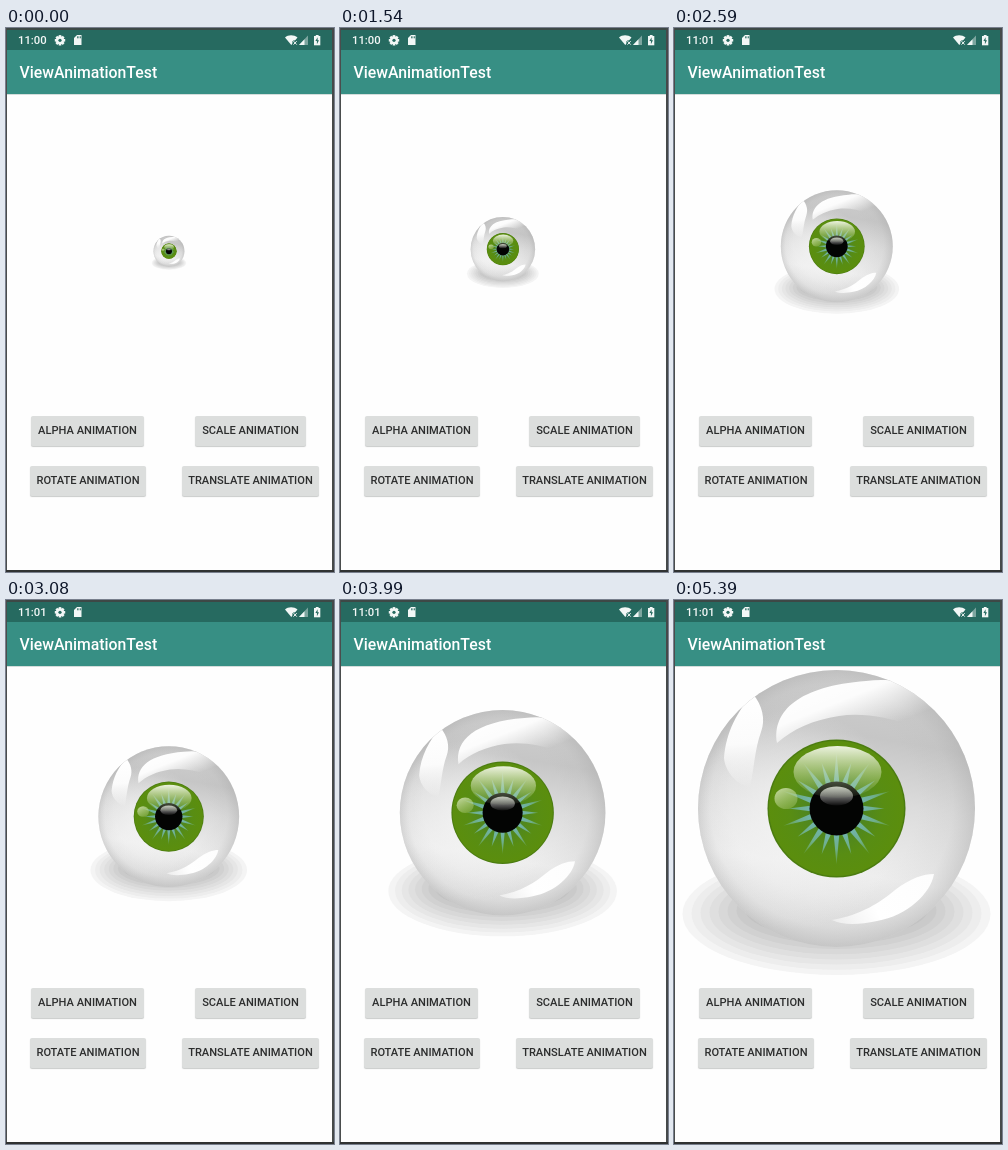
Write an HTML page with a canvas that moves like this. It is 328x544 px and loops after 5.46 s.

```html
<!DOCTYPE html>
<html lang="en">
<head>
<meta charset="utf-8">
<title>View animation</title>
<style>
html, body { margin: 0; width: 100%; height: 100%; overflow: hidden; background: #fefefe; }
#stage { position: relative; width: 328px; height: 544px; overflow: hidden; font-family: Roboto, "Noto Sans", sans-serif; font-weight: 500; }
#stage > * { position: absolute; white-space: nowrap; box-sizing: border-box; }
canvas { left: 0; top: 0; }
#clock { left: 12px; top: 3px; line-height: 19px; font-size: 11.3px; color: #f4f8f7; }
#title { left: 13.5px; top: 22px; line-height: 45px; font-size: 15.8px; color: #fff; }
.btn { height: 30px; line-height: 30px; font-size: 11.1px; text-align: center; color: #2c2d2d; background: #dcdedd; border-radius: 2px; box-shadow: 0 1px 1px #c9cbca; }
</style>
</head>
<body>
<div id="stage">
  <canvas id="c" width="328" height="544"></canvas>
  <div id="clock">11:00</div>
  <div id="title">ViewAnimationTest</div>
  <div class="btn" style="left:25px;top:388px;width:113px">ALPHA ANIMATION</div>
  <div class="btn" style="left:189px;top:388px;width:111px">SCALE ANIMATION</div>
  <div class="btn" style="left:24px;top:438px;width:116px">ROTATE ANIMATION</div>
  <div class="btn" style="left:176px;top:438px;width:137px">TRANSLATE ANIMATION</div>
</div>
<script>
const g = document.getElementById('c').getContext('2d');
const clock = document.getElementById('clock');
const LOOP = 5460, STEP = 70, TAU = Math.PI * 2;

// progress of the scale animation: [ms, fraction]
const keys = [[0, .073], [910, .169], [2100, .324], [2590, .395], [3500, .535], [3920, .622], [4410, .752], [5390, 1]];

function progress(ms) {
  let i = 1;
  while (i < keys.length - 1 && ms > keys[i][0]) i++;
  const [t0, p0] = keys[i - 1], [t1, p1] = keys[i];
  return Math.min(1, p0 + (p1 - p0) * (ms - t0) / (t1 - t0));
}

function scaleAt(ms) {
  return .1 + .9 * (1 - Math.cos(Math.PI * progress(ms))) / 2;
}

function rect(x, y, w, h, fill) {
  g.fillStyle = fill;
  g.fillRect(x, y, w, h);
}

function oval(x, y, rx, ry, fill) {
  g.fillStyle = fill;
  g.beginPath();
  g.ellipse(x, y, rx, ry, 0, 0, TAU);
  g.fill();
}

function shape(d, fill) {
  g.fillStyle = fill;
  g.fill(new Path2D(d));
}

function stops(grad, list) {
  list.forEach(([at, color]) => grad.addColorStop(at, color));
  return grad;
}
const linear = (x0, y0, x1, y1, ...list) => stops(g.createLinearGradient(x0, y0, x1, y1), list);
const radial = (x0, y0, r0, x1, y1, r1, ...list) => stops(g.createRadialGradient(x0, y0, r0, x1, y1, r1), list);

function statusIcons() {
  const white = '#f2f7f6';
  // gear
  g.save();
  g.translate(54, 12.3);
  for (let i = 0; i < 8; i++) {
    rect(-1.3, -5.2, 2.6, 3, white);
    g.rotate(TAU / 8);
  }
  oval(0, 0, 4, 4, white);
  oval(0, 0, 1.6, 1.6, '#266a60');
  g.restore();
  // memory card
  shape('M71 7H75.5V17H68V10Z', white);
  for (let i = 0; i < 3; i++) rect(71 + i * 1.5, 8.3, .8, 2, '#266a60');
  // wifi
  shape('M279 9.5C282 6.4 288 6.4 291.5 9.5L285.3 17Z', white);
  g.strokeStyle = '#266a60';
  g.lineWidth = 3;
  g.stroke(new Path2D('M287 13L291 17M291 13L287 17'));
  g.strokeStyle = white;
  g.lineWidth = 1;
  g.stroke(new Path2D('M287.5 13.2L290.7 16.6M290.7 13.2L287.5 16.6'));
  // signal
  shape('M302 7.5V17H293Z', 'rgba(255,255,255,.4)');
  shape('M298.5 11.2V17H293Z', white);
  // battery
  rect(309.8, 7, 2.8, 2, white);
  rect(308, 8, 6.3, 9.3, white);
  shape('M311.6 9.2L309.4 13H310.9V16.2L313 12.2H311.6Z', '#266a60');
}

function screen() {
  rect(0, 0, 328, 544, '#fefefe');
  rect(0, 0, 328, 22, '#266a60');
  rect(0, 22, 328, 44, '#378f84');
  rect(0, 66, 328, 1, '#d4dddb');
  statusIcons();
}

function edges() {
  rect(0, 0, 328, 2, '#3d4846');
  rect(0, 0, 1, 544, '#4a4d4d');
  rect(326, 0, 2, 544, '#45494a');
  rect(0, 542, 328, 2, '#303232');
}

function ball() {
  const x = 162.5, y = 208.5, r = 138.5;
  g.save();
  g.beginPath();
  g.arc(x, y, r, 0, TAU);
  g.clip();
  rect(20, 65, 290, 290, linear(190, 75, 145, 345,
    [0, '#cfcfcf'], [.22, '#c6c6c6'], [.45, '#dcdcdc'], [.72, '#ededed'], [1, '#dadada']));
  rect(20, 65, 290, 290, radial(150, 200, 95, x, y, r,
    [0, 'rgba(175,175,175,0)'], [.6, 'rgba(175,175,175,.1)'], [1, 'rgba(170,170,170,.42)']));
  rect(20, 65, 290, 290, radial(120, 220, 20, 120, 220, 110,
    [0, 'rgba(245,245,245,.7)'], [1, 'rgba(245,245,245,0)']));
  // window reflections
  shape('M103 143C98 111 125 86 192 81C215 78 242 80 266 104C286 124 292 145 291 158C258 128 205 110 165 116C139 120 119 129 103 143Z',
    linear(150, 78, 176, 142, [0, '#fff'], [.4, 'rgba(255,255,255,.94)'], [1, 'rgba(255,255,255,0)']));
  shape('M50 158C52 132 64 110 79 94C88 105 92 119 87 132C81 148 80 168 76 188C62 184 51 171 50 158Z',
    linear(65, 100, 72, 188, [0, '#fff'], [.5, '#fbfbfb'], [1, 'rgba(255,255,255,0)']));
  shape('M158 320C187 315 207 302 221 290C237 278 249 274 260 274C257 293 233 316 203 321C184 325 168 325 158 320Z',
    linear(160, 318, 258, 276, [0, 'rgba(255,255,255,.5)'], [.4, '#fff'], [1, '#fdfdfd']));
  g.restore();
}

function iris() {
  const x = 162.5, y = 208.5;
  oval(x, y, 69, 69, '#4b7c10');
  oval(x, y, 67.5, 67.5, radial(x, y, 25, x, y, 68, [0, '#4d8522'], [.5, '#588d13'], [1, '#5b8e0d']));
  g.save();
  g.translate(x, y);
  for (let i = 0; i < 20; i++) {
    const len = i % 2 ? 48 : 56;
    shape(`M-3.2 -22L0 -${len}L3.2 -22Z`, radial(0, 0, 25, 0, 0, 56, [0, '#71b4ad'], [.5, '#6fae8b'], [1, '#659b35']));
    g.rotate(TAU / 20);
  }
  g.restore();
  oval(x, y, 27, 27, '#030403');
  oval(x, 196, 16.5, 9.5, linear(0, 186, 0, 206, [0, '#c9c9c9'], [.45, '#777'], [1, '#090909']));
  oval(163.5, 172, 44, 26, linear(0, 146, 0, 198,
    [0, 'rgba(247,250,239,.93)'], [.4, 'rgba(225,235,203,.58)'], [1, 'rgba(190,215,150,.06)']));
  oval(112, 198.5, 11.5, 10.5, linear(106, 189, 117, 210,
    [0, 'rgba(224,237,198,.72)'], [1, 'rgba(180,208,129,.3)']));
}

function eye(s) {
  g.save();
  g.translate(163, 225);
  g.scale(s, s);
  g.translate(-163, -225);
  for (let k = 0; k < 9; k++) {
    const v = 244 - k * 7;
    oval(162.5, 314 - k * .6, 154 - k * 9, 61 - k * 4.6, `rgb(${v},${v},${v})`);
  }
  ball();
  iris();
  g.restore();
}

let last = -1;
function draw(now) {
  const ms = Math.floor(now % LOOP / STEP) * STEP;
  if (ms !== last) {
    last = ms;
    screen();
    eye(scaleAt(ms));
    edges();
    clock.textContent = ms < 2380 ? '11:00' : '11:01';
  }
}

const start = performance.now();
function tick() {
  draw(performance.now() - start);
  requestAnimationFrame(tick);
}
tick();
</script>
</body>
</html>
```
